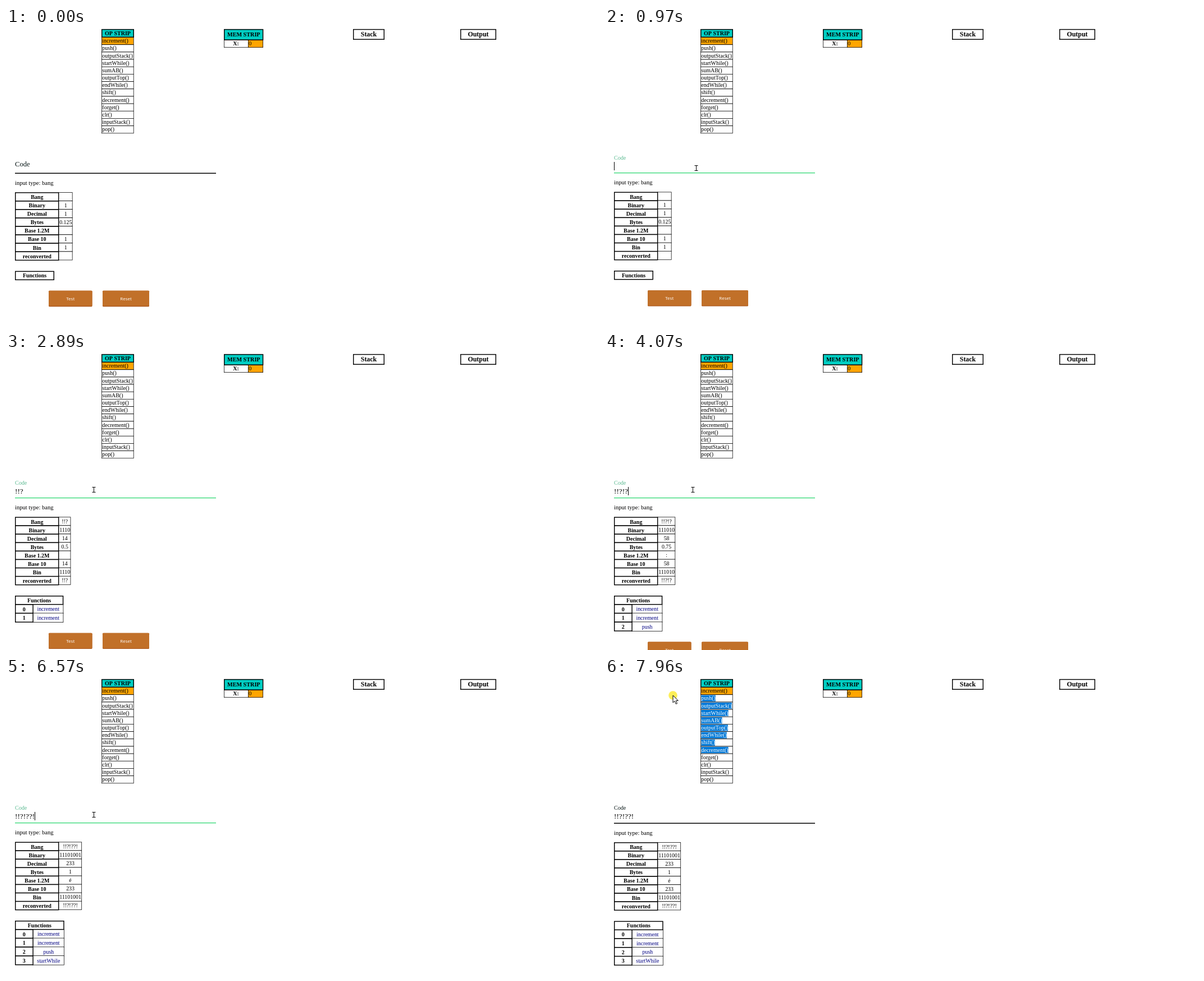
Write an HTML page with a canvas that moves like this. It is 1056 by 530 pixels and loops after 8 s.

```html
<!DOCTYPE html>
<html lang="en">
<head>
<meta charset="utf-8">
<title>Bang code tester</title>
<style>
  html, body { margin: 0; width: 100%; height: 100%; overflow: hidden; background: #fff; }
  canvas { display: block; }
</style>
</head>
<body>
<canvas id="stage" width="1056" height="530"></canvas>
<script>
const ctx = document.getElementById('stage').getContext('2d');
const SERIF = '"Liberation Serif", "Times New Roman", serif';
const SANS = '"Open Sans", sans-serif';
const LOOP = 8000, FOCUS = 740, BLUR = 7660;
const THIN = 0.75, BOLD = 1.45; // the page is shown at about two thirds size
const OPS = ['increment', 'push', 'outputStack', 'startWhile', 'sumAB', 'outputTop', 'endWhile',
  'shift', 'decrement', 'forget', 'clr', 'inputStack', 'pop'];
const OP_TOP = 16.2, OP_PITCH = 13.17, ANCHOR_ROW = 8;
const KEYS = [[1140, '!'], [1760, '!'], [2620, '?'], [3050, '!'], [4070, '?'], [4530, '?'], [4870, '!']];
const CARET_OFF = [[1270, 1760], [1820, 2340], [2890, 3050], [3380, 3920], [4470, 4530],
  [5000, 5510], [6050, 6570], [7120, LOOP]];
// Pointer stops: time, x, y
const PATH = [[30, 1006, 524], [250, 760, 440], [500, 310, 300], [FOCUS, 162, 250], [2010, 162, 250],
  [2170, 156, 244], [7270, 156, 244], [7390, 262, 152], [7510, 340, 87], [7590, 305, 112],
  [BLUR, 262, 129], [7800, 196, 86], [7960, 121, 31]];
const PRESSES = [[FOCUS, 810], [BLUR, LOOP]];

const within = (t, spans) => spans.some(([a, b]) => t >= a && t < b);
const clamp = v => Math.max(0, Math.min(1, v));
const ease = v => v * v * (3 - 2 * v);
const mix = (a, b, p) => a + (b - a) * p;
const blend = (a, b, p) => `rgb(${a.map((v, i) => Math.round(mix(v, b[i], p)))})`;

function rect(x, y, w, h, color) {
  ctx.fillStyle = color;
  ctx.fillRect(x, y, w, h);
}

function box(x, y, right, bottom, line = THIN, fill = '#fff') {
  rect(x, y, right - x, bottom - y, '#000');
  rect(x + line, y + line, right - x - 2 * line, bottom - y - 2 * line, fill);
}

function setFont(size, weight = '', family = SERIF) {
  ctx.font = `${weight} ${size}px ${family}`;
}

function text(s, x, y, { size = 10, weight = '', align = 'left', color = '#000', family } = {}) {
  setFont(size, weight, family);
  ctx.textAlign = align;
  ctx.fillStyle = color;
  ctx.fillText(s, x, y);
}

const heading = (s, x, y, size = 10) => text(s, x, y, { size, weight: 'bold', align: 'center' });
const centered = (s, x, y, color) => text(s, x, y, { size: 9.9, align: 'center', color });

// Each "?" steps along the op strip, each "!" runs the current op.
function run(code) {
  let at = 0;
  const calls = [];
  for (const c of code) {
    if (c === '!') calls.push(OPS[at]);
    else at++;
  }
  return calls;
}

function pointerAt(t) {
  const i = PATH.findIndex(p => p[0] > t);
  if (i === 0) return null;
  if (i < 0) return PATH[PATH.length - 1].slice(1);
  const [t0, x0, y0] = PATH[i - 1], [t1, x1, y1] = PATH[i];
  const p = (t - t0) / (t1 - t0);
  return [mix(x0, x1, p), mix(y0, y1, p)];
}

function drawStrips(t, pointer) {
  const row = pointer ? Math.floor((pointer[1] - OP_TOP) / OP_PITCH) : 0;
  OPS.forEach((op, i) => {
    const y = OP_TOP + i * OP_PITCH, label = op + '()';
    box(170, y, 227.6, y + OP_PITCH + THIN, THIN, i ? '#fff' : '#ffa500');
    const picked = t >= BLUR && i <= ANCHOR_ROW && (i > row || (i === row && pointer[0] < 171));
    if (picked) {
      setFont(10);
      rect(171.3, y + 1.3, ctx.measureText(label).width, 11.2, '#0078d7');
    }
    text(label, 171.3, y + 10, { color: picked ? '#fff' : '#000' });
  });
  box(170, 1.9, 228, 17, BOLD, '#00cec3');
  heading('OP STRIP', 199, 12.6);
  box(388, 21, 431.7, 35);
  box(431, 21, 458, 35, THIN, '#ffa500');
  box(388, 1.9, 458.3, 21.9, BOLD, '#00cec3');
  heading('MEM STRIP', 423.3, 15.2, 10.2);
  heading('X:', 409.5, 31.3);
  text('0', 432.3, 31.3);
  box(618, 1.9, 674, 21, BOLD);
  heading('Stack', 646, 15.3, 11.9);
  box(809, 1.9, 873, 21, BOLD);
  heading('Output', 841, 15.3, 11.9);
}

function drawField(t, code, focused) {
  const up = ease(clamp((t - FOCUS) / 200));
  const green = up * (1 - clamp((t - BLUR) / 200));
  text('Code', 16, mix(247, 234.5, up), {
    size: mix(12.6, 10.1, up), color: blend([10, 24, 24], [92, 186, 146], green)
  });
  text(code, 16, 251.3, { size: 13.2 });
  if (focused) rect(16, 258, 358, 1.2, '#1fd468');
  else rect(16, 258.5, 358, 1.5, '#000');
  if (focused && !within(t, CARET_OFF)) {
    setFont(13.2);
    rect(Math.round(16 + ctx.measureText(code).width), 239, 1, 15, '#000');
  }
}

function drawInfo(code, dy) {
  const bits = '1' + [...code].map(c => c === '!' ? 1 : 0).join('');
  const value = parseInt(bits, 2);
  const rows = [['Bang', code], ['Binary', bits], ['Decimal', value], ['Bytes', bits.length / 8],
    ['Base 1.2M', value < 32 ? '' : String.fromCharCode(value)], ['Base 10', value],
    ['Bin', bits], ['reconverted', code]];
  setFont(9.9);
  const right = 96.3 + Math.max(...rows.map(r => ctx.measureText(r[1]).width));
  text('input type: bang', 16, 279.4 + dy, { size: 10.56 });
  rows.forEach(([name, v], i) => {
    const y = 292.5 + dy + i * 15.06;
    box(93, y, right, y + 15.06 + THIN);
    box(16, y, 94.4, y + 15.06 + BOLD, BOLD);
    heading(name, 55.3, y + 12);
    centered(v, (94 + right) / 2, y + 11.5);
  });
}

function drawFunctions(code, dy) {
  const calls = run(code), top = 433 + dy;
  const right = !calls.length ? 86 : calls.includes('startWhile') ? 103.7 : 102.3;
  calls.forEach((name, i) => {
    const y = top + 15 + i * 15.75;
    box(47, y, right, y + 15.75 + BOLD);
    box(16, y, 48.8, y + 15.75 + BOLD, BOLD);
    heading(i, 32.3, y + 12.5);
    centered(name, (48 + right) / 2, y + 12.3, '#000080');
  });
  box(16, top, right, top + 16.4, BOLD);
  heading('Functions', (16 + right) / 2, top + 11.8);
  const y = top + 35.2 + calls.length * 15.75;
  button('Test', 76, 77.5, y);
  button('Reset', 172, 83, y);
}

function button(label, x, w, y) {
  ctx.beginPath();
  ctx.roundRect(x, y, w, 28.4, 1.5);
  ctx.fillStyle = '#a84f13';
  ctx.fill();
  ctx.beginPath();
  ctx.roundRect(x, y, w, 27.2, 1.5);
  ctx.fillStyle = '#c17029';
  ctx.fill();
  text(label, x + w / 2, y + 17.2, { size: 8, align: 'center', color: '#fff', family: SANS });
}

function drawPointer(t, [x, y]) {
  if (within(t, PRESSES)) {
    ctx.beginPath();
    ctx.arc(x, y, 7.8, 0, 7);
    ctx.fillStyle = '#fdee58';
    ctx.fill();
  }
  ctx.strokeStyle = '#000';
  ctx.lineWidth = 1;
  if (x > 16 && x < 374 && y > 238 && y < 258) {
    const cx = Math.round(x) + 0.5, cy = Math.round(y);
    ctx.stroke(new Path2D(`M${cx - 3} ${cy - 4.5}h6M${cx} ${cy - 5}v10M${cx - 3} ${cy + 4.5}h6`));
    return;
  }
  const arrow = new Path2D(`M${x} ${y}v13l3-2.8 2.3 5.2 2.2-1-2.2-5h4z`);
  ctx.fillStyle = '#fff';
  ctx.fill(arrow);
  ctx.stroke(arrow);
}

function draw(now) {
  const t = now % LOOP;
  const focused = t >= FOCUS && t < BLUR, dy = focused ? 0 : 0.66;
  const code = KEYS.filter(k => t >= k[0]).map(k => k[1]).join('');
  const pointer = pointerAt(t);
  rect(0, 0, 1056, 530, '#fff');
  drawStrips(t, pointer);
  drawField(t, code, focused);
  drawInfo(code, dy);
  drawFunctions(code, dy);
  if (pointer) drawPointer(t, pointer);
  requestAnimationFrame(() => draw(performance.now()));
}
draw(0);
</script>
</body>
</html>
```
